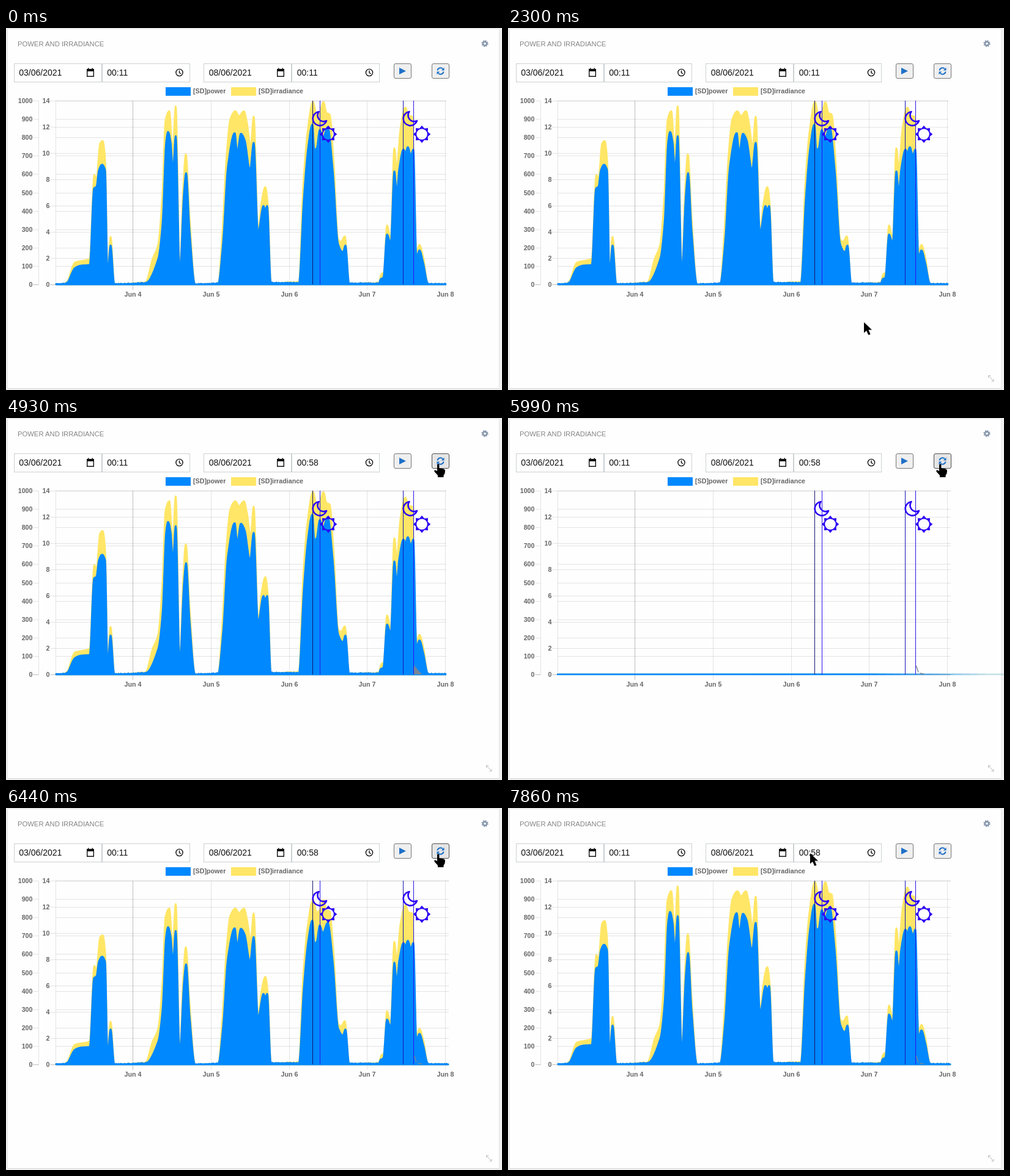
An HTML page for the animation above (8000 ms loop, 811 by 593 pixels).

```html
<!DOCTYPE html>
<html lang="en">
<head>
<meta charset="utf-8">
<title>Power and irradiance</title>
<style>
  html, body { margin: 0; width: 100%; height: 100%; overflow: hidden; background: #f0f0f0; }
  svg { display: block; width: 811px; height: 593px; font-family: "Liberation Sans", Arial, sans-serif; }
  .title { font-size: 11.25px; fill: #858585; }
  .label { font-size: 10.7px; font-weight: bold; fill: #666; }
  .field { font-size: 14px; fill: #111; }
  .end { text-anchor: end; }
  .middle { text-anchor: middle; }
  .box { fill: #fff; stroke: #ccd0d2; }
  .button { fill: #efefef; stroke: #767676; }
  .series path { vector-effect: non-scaling-stroke; stroke-width: 3; stroke-linejoin: round; }

  .series { transform-origin: 0 420px; animation: grow 8s infinite linear; }
  .cursor { animation: move 8s infinite linear; }
  .step { animation-duration: 8s; animation-iteration-count: infinite; animation-timing-function: step-end; }
  .inside { animation-name: inside; }
  .arrow { animation-name: arrow; }
  .hand { animation-name: hand; }
  .refresh { animation-name: refresh; }
  .old-time { animation-name: old-time; }
  .new-time { animation-name: new-time; }
  .wedge { animation-name: wedge; }
  .before { animation-name: before; }
  .after { animation-name: after; }

  @keyframes grow {
    0%, 74.87% { transform: scaleY(1); }
    74.875%, 75% { transform: scaleY(.001); animation-timing-function: cubic-bezier(.25, 1, .5, 1); }
    87.5%, 100% { transform: scaleY(1); }
  }
  @keyframes move {
    0%, 8% { transform: translate(625px, 585px); }
    9.5% { transform: translate(612px, 563px); }
    11.5% { transform: translate(565px, 552px); }
    13.25%, 28.74% { transform: translate(537px, 549px); }
    28.75% { transform: translate(582px, 482px); }
    29.6% { transform: translate(584px, 480px); }
    32% { transform: translate(695px, 340px); }
    34.5% { transform: translate(765px, 230px); }
    36.25% { transform: translate(782px, 160px); }
    38.5% { transform: translate(767px, 109px); }
    40.25%, 41% { transform: translate(744px, 87px); }
    42.5% { transform: translate(723px, 80px); }
    48.25%, 51.37% { transform: translate(706px, 76px); }
    51.375%, 93.24% { transform: translate(706px, 75px); }
    93.25% { transform: translate(682px, 73px); }
    95.75% { transform: translate(570px, 71px); }
    98.25%, 100% { transform: translate(494px, 74px); }
  }
  @keyframes inside { 0% { visibility: hidden; } 8%, 100% { visibility: visible; } }
  @keyframes arrow {
    0% { visibility: hidden; } 8% { visibility: visible; }
    42.5% { visibility: hidden; } 93.25%, 100% { visibility: visible; }
  }
  @keyframes hand {
    0% { visibility: hidden; } 42.5% { visibility: visible; } 93.25%, 100% { visibility: hidden; }
  }
  @keyframes refresh {
    0% { fill: #efefef; stroke: #767676; }
    42.5% { fill: #e5e5e5; stroke: #4f4f4f; }
    60.125% { fill: #f5f5f5; stroke: #8d8d8d; }
    60.875% { fill: #e5e5e5; stroke: #4f4f4f; }
    93.25%, 100% { fill: #efefef; stroke: #767676; }
  }
  @keyframes old-time { 0% { visibility: visible; } 61.6%, 100% { visibility: hidden; } }
  @keyframes new-time { 0% { visibility: hidden; } 61.6%, 100% { visibility: visible; } }
  @keyframes wedge {
    0% { visibility: hidden; } 30.375% { visibility: visible; } 74.875%, 100% { visibility: hidden; }
  }
  @keyframes before { 0% { visibility: visible; } 74.875%, 100% { visibility: hidden; } }
  @keyframes after { 0% { visibility: hidden; } 74.875%, 100% { visibility: visible; } }
</style>
</head>
<body>
<svg viewBox="0 0 811 593">
  <defs>
    <g id="calendar">
      <path d="M1.7 4V14.3H12.3V4" fill="none" stroke="#111" stroke-width="1.4"/>
      <path d="M1 2H13V6H1ZM3 .5H4.5V3H3ZM9.5 .5H11V3H9.5Z" fill="#111"/>
    </g>
    <g id="clock" fill="none" stroke="#111" stroke-width="1.4">
      <circle r="5.6"/><path d="M0 -3.6V.4L2.8 2"/>
    </g>
    <path id="moon" d="M511.5 137A11.5 11.5 0 1 0 524 152A10 10 0 0 1 511.5 137Z"
      fill="none" stroke="#2a00f5" stroke-width="2.6" stroke-linejoin="round"/>
    <path id="sun" fill="#2a00f5" fill-rule="evenodd"/>
    <g id="half-turn">
      <path d="M-5 -1A5 5 0 0 1 3.6 -3.6" fill="none" stroke="#1f70c8" stroke-width="1.9"/>
      <path d="M6 -5.8V-1H1.2Z" fill="#1f70c8"/>
    </g>
  </defs>

  <rect x="2.5" y="1.5" width="804" height="589" fill="#fefefe" stroke="#e4e4e4"/>
  <path d="M3 590.5H806" stroke="#d6d6d6"/>
  <text class="title" x="19" y="30">POWER AND IRRADIANCE</text>
  <g transform="translate(783 25.5)" fill="none" stroke="#8898ad">
    <circle r="3.1" stroke-width="2.6"/>
    <circle r="4.8" stroke-width="1.7" stroke-dasharray="1.95 1.82"/>
  </g>

  <g class="box">
    <rect x="13.5" y="58.5" width="143" height="30"/>
    <rect x="157.5" y="58.5" width="143" height="30"/>
    <rect x="323.5" y="58.5" width="143" height="30"/>
    <rect x="467.5" y="58.5" width="143" height="30"/>
  </g>
  <g class="field">
    <text x="21.3" y="78">03/06/2021</text>
    <text x="165.3" y="78">00:11</text>
    <text x="331.8" y="78">08/06/2021</text>
    <text class="step old-time" x="475.8" y="78">00:11</text>
    <text class="step new-time" x="475.8" y="78">00:58</text>
  </g>
  <use href="#calendar" x="131" y="65"/>
  <use href="#calendar" x="442" y="65"/>
  <use href="#clock" x="283.5" y="73"/>
  <use href="#clock" x="594" y="73"/>

  <rect class="button" x="634.5" y="58.5" width="28" height="24" rx="2.5"/>
  <path d="M643 65L654 70.5L643 76Z" fill="#1f70c8"/>
  <rect class="button step refresh" x="696.5" y="58.5" width="28" height="24" rx="2.5"/>
  <g transform="translate(710.5 70.5)">
    <use href="#half-turn"/><use href="#half-turn" transform="rotate(180)"/>
  </g>

  <rect x="261" y="97" width="41" height="14" fill="#08f"/>
  <rect x="368" y="97" width="41" height="14" fill="#ffe666"/>
  <text class="label" x="306" y="107">[SD]power</text>
  <text class="label" x="413" y="107">[SD]irradiance</text>

  <g id="axes"></g>
  <g class="series">
    <path id="irradiance" fill="#ffe666" stroke="#ffe666"/>
    <path id="power" fill="#08f" stroke="#08f"/>
  </g>
  <path class="step wedge" d="M667 405L680 420H667Z" fill="#788696"/>
  <path class="step after" d="M667.5 406L671 416.5M673.5 418L680 419.5" stroke="#788696" stroke-width="1.4"/>
  <rect class="step before" x="720" y="115" width="8" height="308" fill="#fefefe"/>

  <path d="M501.5 119V420" stroke="#14146e"/>
  <path d="M649.5 119V420" stroke="#1616b4"/>
  <path d="M513.5 119V420M666.5 119V420" stroke="#2a14ea"/>
  <use href="#moon"/><use href="#moon" x="148"/>
  <use href="#sun" x="527" y="174"/><use href="#sun" x="680" y="174"/>

  <path class="step inside" d="M786.5 570.5L793 577.5M785.5 573V569.5H789M794 575V578.5H790.5"
    fill="none" stroke="#b9b9b9"/>
  <g class="cursor">
    <path class="step arrow" d="M0 0V17.5L4 13.8L7.3 21L10.5 19.6L7.4 12.6H13Z"/>
    <path class="step hand" d="M-1 1.5Q.5 -.8 2.4 1.5V7L10 8.6Q12 9.2 12 12L11.4 16L9.5 19V22H0V19L-5 13.5Q-7 10.6 -4 10.2L-1 12Z"/>
  </g>
</svg>
<script>
  const TOP = 119.5, BASE = 420.5, LEFT = 81.5, RIGHT = 724;
  const $ = id => document.getElementById(id);

  // x position and height above the baseline, in pairs
  const power = [
    98,1, 113,27, 123,31, 137,32, 144,158, 148,161, 152,188, 157,197, 162,188, 166,14, 171,64, 177,0,
    228,2, 249,42, 256,100, 262,235, 265,251, 269,235, 273,186, 277.5,244, 284,18, 291,150, 294.5,183, 300,90, 309,0,
    347,1, 355,70, 363,195, 374,249, 378,216, 384,248, 390,238, 399,187, 405,233, 412,84, 421,129, 424,122, 427,129, 433,2,
    479,2, 487,140, 494,224, 501,263, 504,222, 508,224, 513,254, 518,240, 526,259, 534,190, 543,66, 551,53, 555,64, 561,1,
    609,1, 613,9, 617,11, 623,82, 629,67, 635,186, 639,150, 643,190, 650,222, 653,216, 657,226, 662,212, 666,222, 671,44, 676,56, 682,36, 690,1
  ];
  const irradiance = [
    98,2, 113,36, 126,39, 137,42, 144.5,180, 148,172, 154,232, 158,236, 162,205, 166,16, 171,78, 177,0,
    228,3, 240,42, 249,66, 256,150, 261,270, 267,285, 272.5,215, 277.5,293, 284,18, 290,160, 294,214, 300,110, 309,0,
    347,1, 354,85, 361,215, 367,272, 375,285, 381,277, 389,285, 394,265, 400,225, 405,276, 412,86, 418,135, 424,160, 428,130, 433,2,
    479,4, 486,160, 493,250, 502,300, 508,278, 513,282, 519,300, 524,282, 529,280, 535,210, 543,74, 548,70, 554,79, 561,1,
    609,2, 614,17, 618,20, 623,97, 629,72, 635,224, 639,190, 645,255, 653,291, 658,278, 664,276, 667,180, 671,50, 676,65, 682,45, 690,1
  ];

  // monotone cubic interpolation
  function curve(pairs) {
    const xs = pairs.filter((_, i) => i % 2 === 0), ys = pairs.filter((_, i) => i % 2);
    const secant = i => (ys[i + 1] - ys[i]) / (xs[i + 1] - xs[i]);
    const slope = xs.map((_, i) => {
      if (i === 0 || i === xs.length - 1) return 0;
      const a = secant(i - 1), b = secant(i);
      return a * b <= 0 ? 0 : 2 * a * b / (a + b);
    });
    return x => {
      const i = xs.findIndex((start, k) => start <= x && x < xs[k + 1]);
      if (i < 0) return 0;
      const w = xs[i + 1] - xs[i], u = (x - xs[i]) / w, v = 1 - u;
      return ys[i] * v * v * (1 + 2 * u) + ys[i + 1] * u * u * (3 - 2 * u)
        + w * u * v * (slope[i] * v - slope[i + 1] * u);
    };
  }

  function area(pairs) {
    const height = curve(pairs);
    let d = "M82 420";
    for (let x = 82; x <= 723; x += .5) {
      const ripple = Math.abs(Math.sin(x * 12.9898) * 43758.5) % 1;
      const h = height(x);
      d += `L${x} ${(420 - h * .995 - (h < 3 ? ripple ** 4 * 1.2 : 0)).toFixed(2)}`;
    }
    return d + "V420Z";
  }

  const line = (x1, y1, x2, y2, alpha) =>
    `<path d="M${x1} ${y1}L${x2} ${y2}" stroke="#000" stroke-opacity="${alpha}"/>`;
  const label = (x, y, text, align) => `<text class="label ${align}" x="${x}" y="${y}">${text}</text>`;

  function scale(max, step, axisX) {
    let out = line(axisX, TOP, axisX, BASE, .1);
    for (let v = 0; v <= max; v += step) {
      const y = Math.round(BASE - v / max * (BASE - TOP) - .5) + .5;
      const alpha = v ? .1 : .25;
      out += line(axisX - 9, y, axisX, y, alpha) + line(LEFT, y, RIGHT, y, alpha)
        + label(axisX - 10, y + 3.7, v, "end");
    }
    return out;
  }

  let axes = scale(1000, 100, 53.5) + scale(14, 2, LEFT);
  for (let day = 0; day < 5; day++) {
    const x = Math.round(207 + day * 127.75) + .5;
    axes += line(x, TOP, x, 429, day ? .1 : .25) + label(x, 440, `Jun ${day + 4}`, "middle");
  }
  $("axes").innerHTML = axes;
  $("irradiance").setAttribute("d", area(irradiance));
  $("power").setAttribute("d", area(power));

  const star = Array.from({ length: 16 }, (_, i) => {
    const r = i % 2 ? 10.4 : 14.2, a = i * Math.PI / 8;
    return `${(r * Math.cos(a)).toFixed(2)} ${(r * Math.sin(a)).toFixed(2)}`;
  });
  $("sun").setAttribute("d", `M${star.join("L")}ZM8.8 0A8.8 8.8 0 1 0 -8.8 0A8.8 8.8 0 1 0 8.8 0Z`);
</script>
</body>
</html>
```
